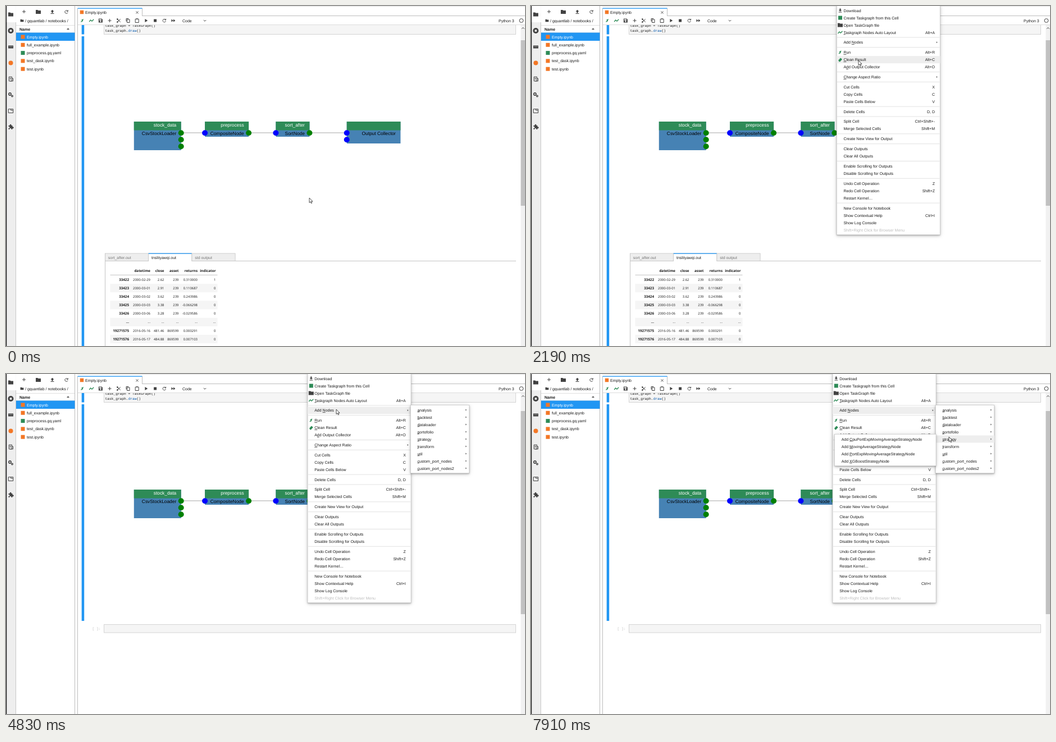
These frames come from a looping animation (924 px wide and 606 px high, 7990 ms). An HTML page:

```html
<!DOCTYPE html>
<html lang="en">
<head>
<meta charset="utf-8">
<title>Task graph notebook</title>
<style>
html, body { margin: 0; width: 100%; height: 100%; overflow: hidden; background: #fff; }
svg { display: block; width: 924px; height: 606px; }
text { font: 7px "Liberation Sans", Arial, sans-serif; fill: #1a1a1a; white-space: pre; text-rendering: geometricPrecision; }
.end { text-anchor: end; }
.b { font-weight: 700; }
.dim { fill: #bdbdbd; }
.soft { fill: #757575; }
.node { font-size: 8.37px; fill: #000; }
.w { fill: #fff; }
.code { font: 6.22px "Liberation Mono", monospace; }
.cell { font: 5.95px "Open Sans", "Noto Sans", sans-serif; }
.head { font: 700 6.25px "Open Sans", "Noto Sans", sans-serif; }
.u { text-decoration: underline; }
.shadow { filter: drop-shadow(0 1.6px 1.3px rgba(0, 0, 0, .22)) drop-shadow(0 2.4px 2.7px rgba(0, 0, 0, .14)) drop-shadow(0 .5px 4.5px rgba(0, 0, 0, .1)); }
.line { fill: none; stroke: #424242; stroke-width: 1; }
.green { fill: none; stroke: #2e8b57; stroke-width: 1.3; }
</style>
</head>
<body>
<svg id="stage" viewBox="0 0 924 606"></svg>
<script>
const LOOP = 7990, ROW = 13, SEP = 4.82;
const INK = '#424242', BLUE = '#2196f3', ORANGE = '#f37726', GREEN = '#2e8b57';

const rect = (x, y, w, h, fill, more = '') =>
  `<rect x="${x}" y="${y}" width="${w}" height="${h}" fill="${fill}" ${more}/>`;
const text = (x, y, s, cls = '') => `<text x="${x}" y="${y + 2.5}" class="${cls}">${s}</text>`;
const dot = (x, y, r, fill) => `<circle cx="${x}" cy="${y}" r="${r}" fill="${fill}"/>`;
const ring = (x, y, r, width) =>
  `<circle cx="${x}" cy="${y}" r="${r}" fill="none" stroke="${INK}" stroke-width="${width}"/>`;
const hline = (x, y, w, color = '#d5d5d5') => rect(x, y, w, 1, color);
const square = (x, y, fill, s = 7) => rect(x - s / 2, y - s / 2, s, s, fill);
const group = (id, body) => `<g id="${id}">${body}</g>`;

// Icons are centred on 0,0; names in `stroked` are drawn as outlines.
const shapes = {
  folder: 'M-4.5-3.5h3.5l1 1h4.5v6h-9z',
  plus: 'M-3 0h6M0-3v6',
  refresh: 'M2.3-1.4A2.7 2.7 0 1 0 2.6 1M2.8-3.2v2.2H.6',
  upload: 'M0-3.8l3 3h-1.7v2.5h-2.6v-2.5H-3zM-3 2.5h6v1h-6z',
  download: 'M0 1.8l-2.8-2.6h1.7v-2.7h2.2v2.7h1.7zM-2.8 2.4h5.6v1h-5.6z',
  save: 'M-3.5-3.5h5.5l1.5 1.5v5.5h-7zM-2.3-2.5v2h3.8v-2zM-1.2 1.2a1.2 1.2 0 1 0 2.4 0a1.2 1.2 0 1 0-2.4 0z',
  cut: 'M-3-3.2L2.8 2.8M-3 3.2L2.8-2.8M-3.4-2.5a1 1 0 1 0 2 0a1 1 0 1 0-2 0M-3.4 2.5a1 1 0 1 0 2 0a1 1 0 1 0-2 0',
  copy: 'M-1.5-2h4.5v5.5h-4.5zM-3 1.5v-5h4.2',
  paste: 'M-3-2.8h6v6.3h-6zM-1.3-3.3h2.6',
  play: 'M-2-3l4.8 3l-4.8 3z',
  stop: 'M-2.5-2.5h5v5h-5z',
  forward: 'M-3.5-2.6l3.4 2.6l-3.4 2.6zM0-2.6l3.4 2.6l-3.4 2.6z',
  down: 'M-2.2-1l2.2 2.2l2.2-2.2',
  up: 'M-2.2 1.2L0-1.2l2.2 2.4',
  close: 'M-2-2l4 4M2-2l-4 4',
  graph: 'M-4 2l2.4-3l2.4 2l3.2-3.2',
  run: 'M-2.5 2.5l2-2l1 .8M-1.5-1l2.5-1l-.8 2.4',
  eraser: 'M-3.3 1l3.8-4.2l3 2.6l-3.8 4.2h-1.6z',
  keys: 'M-4.5-2.5h9v5h-9zM-3-1v1h1v-1zM-.5-1v1h1v-1zM2-1v1h1v-1z',
  doc: 'M-3.2-3.8h5.2v7.6h-5.2zM2.5-1h1.5v4.8h-5M-1.8-1.5h2.4M-1.8.3h2.4',
  tab: 'M-4.2-3.3h8.4v6.8h-8.4zM.2-3.3v2.2h4',
  puzzle: 'M-4-2.5h2.3a1.5 1.5 0 1 1 2.6 0h2.1v2.4a1.5 1.5 0 1 1 0 2.6v1.8h-2.4a1.4 1.4 0 1 0-2.4 0h-2.2v-2.3a1.4 1.4 0 1 0 0-2.4z',
  arrow: 'M-1-1.5l1.8 1.5l-1.8 1.5z',
};
const stroked = 'plus refresh cut copy paste down up close doc tab'.split(' ');
const greens = ['graph', 'run'];
const icon = (name, x, y, fill = INK) => {
  const look = stroked.includes(name) ? 'class="line"'
    : greens.includes(name) ? 'class="green"' : `fill="${fill}" fill-rule="evenodd"`;
  return `<path d="${shapes[name]}" transform="translate(${x} ${y})" ${look}/>`;
};

function sidebar() {
  const files = ['Empty.ipynb', 'full_example.ipynb', 'preprocess.gq.yaml', 'test_dask.ipynb', 'test.ipynb'];
  return rect(0, 0, 1.5, 606, '#111') + rect(1.5, 0, 16, 606, '#eee') + rect(1.5, 0, 16, 29, '#fff')
    + rect(17, 29, 1, 577, '#c8c8c8') + rect(122, 0, 1, 606, '#bdbdbd')
    + icon('folder', 8.5, 15) + dot(8.5, 44, 5, INK) + square(8.5, 44, '#eee', 3.6)
    + icon('keys', 8.5, 73) + dot(8.5, 101.5, 4, ORANGE) + icon('doc', 8.5, 130)
    + ring(7, 157, 2.1, 1.6) + ring(11, 160.5, 1.3, 1.3)
    + icon('tab', 8.5, 187) + icon('puzzle', 8.5, 215.5)
    + icon('plus', 32, 10) + icon('folder', 57.5, 10.5) + icon('upload', 82.5, 10.5) + icon('refresh', 107.5, 10.5)
    + `<g transform="translate(28.5 26) scale(.65)">${icon('folder', 0, 0)}</g>`
    + text(34, 26, '/ gquantlab / notebooks /')
    + hline(18, 34, 104, '#e0e0e0') + hline(18, 47, 104, '#e0e0e0')
    + text(24, 41, 'Name', 'b') + `<path d="M108 42l2.5-2.6l2.5 2.6z" fill="${INK}"/>`
    + rect(18, 47.5, 104.5, 14.5, BLUE)
    + files.map((name, i) => {
      const y = 55 + 14.3 * i;
      return square(30, y, name.endsWith('yaml') ? GREEN : ORANGE) + text(37, y, name, i ? '' : 'w');
    }).join('');
}

function chrome() {
  const tools = 'run graph save plus cut copy paste play stop refresh forward'.split(' ');
  return rect(127, 0, 797, 33.5, '#fff') + rect(127, 4, 1, 602, '#bdbdbd')
    + hline(127, 0, 797, '#e4e4e4') + hline(242, 17, 682, '#bdbdbd')
    + rect(242, 4, 1, 14, '#bdbdbd') + rect(127.5, 3.5, 115, 1.3, BLUE)
    + square(135, 11, ORANGE, 6.5) + text(141, 11, 'Empty.ipynb') + icon('close', 233.5, 11.5)
    + tools.map((name, i) => icon(name, 136 + 16.2 * i, 26)).join('')
    + text(314, 26, 'Code') + icon('down', 354, 26) + text(877, 26, 'Python 3')
    + `<circle cx="917.5" cy="26" r="3.4" class="line"/>` + hline(128, 33, 796, '#dcdcdc');
}

function node(x, w, h, title, label, ins, outs) {
  const tx = x + w - 8.5, ports = (n, px, color) =>
    Array.from({ length: n }, (_, i) => dot(px, 226.2 + 12 * i, 5, color)).join('');
  return rect(x, 206, w, h, '#4682b4') + rect(x, 206, w, 15.5, GREEN)
    + text(tx, 212, title, 'node end w') + text(tx, 227.3, label, 'node end')
    + ports(ins, x, '#00f') + ports(outs, x + w, 'green');
}

function notebook() {
  const box = 'stroke="#d4d4d4" stroke-width="1"';
  return rect(174.5, 20, 733, 30.5, '#f5f5f5', box)
    + text(176.5, 34, 'task_graph = TaskGraph()', 'code')
    + text(176.5, 43.3, 'task_graph.<tspan fill="#0055aa">draw</tspan>()', 'code')
    + rect(134.7, 33, 4.5, 17.5, BLUE)
    + [[312, 354], [432, 481], [540, 607]].map(([a, b]) => rect(a, 225.5, b - a, 1, '#a6a6a6')).join('')
    + node(227.8, 83.9, 51, 'stock_data', 'CsvStockLoader', 0, 3)
    + node(354.1, 78, 27, 'preprocess', 'CompositeNode', 1, 1)
    + node(480.4, 60, 27, 'sort_after', 'SortNode', 1, 1)
    + node(606.7, 95.7, 39, '', 'Output Collector', 2, 0);
}

const scrollbar = (y, h) => rect(916.5, 34, 7.5, 572, '#f1f1f1') + rect(916.5, y, 7.5, h, '#c1c1c1') + icon('up', 920.5, 39.5);

function results() {
  const cols = [219, 257, 281.5, 307.5, 341, 373.5];
  const rows = [
    '33422 2000-02-29 2.62 239 0.310000 1', '33423 2000-03-01 2.91 239 0.110687 0',
    '33424 2000-03-02 3.62 239 0.243986 0', '33425 2000-03-03 3.38 239 -0.066298 0',
    '33426 2000-03-06 3.28 239 -0.029586 0', '... ... ... ... ... ...',
    '19271575 2016-05-16 481.46 869599 0.000291 0', '19271576 2016-05-17 484.88 869599 0.007103 0'];
  const tab = (i, name, on) => {
    const x = 176.5 + 77.2 * i;
    return rect(x, 441, 77.2, 13.5, on ? '#fff' : '#eee', 'stroke="#c4c4c4" stroke-width=".8"')
      + (on ? rect(x, 440.5, 77.2, 1.3, BLUE) + rect(x + .5, 453, 76.2, 3, '#fff') : '')
      + text(x + 5.3, 448, name, on ? '' : 'soft');
  };
  return rect(134.7, 54, 4.5, 552, BLUE) + hline(176, 454, 732, '#c4c4c4') + rect(176, 441, 1, 165, '#c4c4c4')
    + tab(0, 'sort_after.out') + tab(1, 'tnslityawqi.out', true) + tab(2, 'std output')
    + 'datetime close asset returns indicator'.split(' ').map((h, i) => text(cols[i + 1], 471.7, h, 'head end')).join('')
    + hline(185.5, 479, 191, '#c4c4c4')
    + rows.map((row, r) => {
      const y = 487.5 + 15.15 * r;
      return (r % 2 ? rect(185.5, y - 7.5, 191, 15.15, '#f5f5f5') : '')
        + row.split(' ').map((v, i) => text(cols[i], y - .3, v, i ? 'cell end' : 'head end')).join('');
    }).join('') + scrollbar(61, 295);
}

const emptyCell = () => rect(134.7, 54, 4.5, 386, BLUE)
  + text(153.5, 453.8, '[ ]:', 'code dim') + rect(174.5, 446.5, 733, 14.5, '#f5f5f5', 'stroke="#d4d4d4" stroke-width="1"')
  + scrollbar(66, 362);

// Item syntax: "icon:Label|shortcut"; "&" marks the mnemonic, ">" a submenu, "-" a separator.
const menus = {};
function menu(id, x, first, w, items) {
  let y = first, body = '';
  const rows = menus[id] = [];
  for (const item of items) {
    if (item === '-') {
      body += hline(x + 1, y - ROW / 2 + SEP / 2 - .5, w - 2, '#e2e2e2');
      y += SEP;
      continue;
    }
    const [, name, label, key] = item.match(/^(?:(\w+):)?([^|]+)\|?(.*)$/);
    if (name === 'block') body += square(x + 6.5, y, GREEN);
    else if (name) body += icon(name, x + 6.5, y, name === 'eraser' ? GREEN : INK);
    body += text(x + 12.4, y, label.replace(/&(.)/, '<tspan class="u">$1</tspan>'), label.startsWith('Shift') ? 'dim' : '');
    if (key === '>') body += icon('arrow', x + w - 5.7, y);
    else if (key) body += text(x + w - 9.5, y, key, 'end');
    rows.push(y);
    y += ROW;
  }
  const top = first - 9;
  return group(id, rect(x, top, w, y - 4 - top, '#fff', 'class="shadow"')
    + rect(x + .3, top + .3, w - .6, y - 4.6 - top, 'none', 'stroke="#bdbdbd" stroke-width=".6"')
    + rect(x, -50, w, ROW, '#eee', 'class="hover"') + body);
}

const mainItems = ['download:Download', 'block:Create Taskgraph from this Cell', 'folder:Open TaskGraph file',
  'graph:&Taskgraph Nodes Auto Layout|Alt+A', '-', 'Add &Nodes|>', '-',
  'run:&Run|Alt+R', 'eraser:&Clean Result|Alt+C', 'A&dd Output Collector|Alt+O', '-', '&Change Aspect Ratio|>', '-',
  'Cut Cells|X', 'Copy Cells|C', 'Paste Cells Below|V', '-', 'Delete Cells|D, D', '-',
  'Split Cell|Ctrl+Shift+-', 'Merge Selected Cells|Shift+M', '-', 'Create New View for Output', '-',
  'Clear Outputs', 'Clear All Outputs', '-', 'Enable Scrolling for Outputs', 'Disable Scrolling for Outputs', '-',
  'Undo Cell Operation|Z', 'Redo Cell Operation|Shift+Z', 'Restart Kernel…', '-',
  'New Console for Notebook', 'Show Contextual Help|Ctrl+I', 'Show Log Console', 'Shift+Right Click for Browser Menu'];
const nodeGroups = 'analysis backtest dataloader portofolio strategy transform util custom_port_nodes custom_port_nodes2';
const adders = names => names.split(' ').map(n => `Add &${n}Node`);

const $ = id => document.getElementById(id);
$('stage').innerHTML = notebook() + group('results', results()) + group('blank', emptyCell())
  + chrome() + sidebar()
  + menu('main', 0, 8, 184.5, mainItems)
  + menu('groups', 720, 64, 105, nodeGroups.split(' ').map(n => `&${n}|>`))
  + menu('transform', 599, 129, 122.3, adders('AssetFilter AssetIndicator Average DatetimeFilter Drop Indicator LeftMerge Max Min Rename ReturnFeature Sort ValueFilter'))
  + menu('strategy', 540.3, 116, 181, adders('CpuPortExpMovingAverageStrategy MovingAverageStrategy PortExpMovingAverageStrategy XGBoostStrategy'))
  + '<path id="cursor" d="M0 0v8.6l2-1.8l1.4 3l1.4-.7l-1.4-2.8h2.6z" fill="#fff" stroke="#222" stroke-width=".8"/>';

// Pointer moves: first step, last step (ms), number of steps, end point.
const moves = [
  [70, 310, 4, 543, 304], [1030, 1570, 8, 579, 134], [1650, 1810, 3, 581, 105],
  [1870, 2030, 3, 583, 97], [2430, 2810, 6, 537, 285],
  [3890, 4110, 4, 577, 139], [4190, 4590, 6, 588, 63],
  [5130, 5590, 7, 730, 68], [5670, 5910, 4, 766, 94],
  [5990, 6150, 3, 766, 115], [6230, 6390, 3, 767, 126],
  [6910, 7130, 4, 760, 113], [7830, 7910, 2, 744, 112]];

function pointer(t) {
  let x = 540, y = 342;
  for (const [from, to, steps, x1, y1] of moves) {
    if (t < from) break;
    const step = Math.min(steps, Math.floor((t - from) / (to - from) * (steps - 1) + 1e-6) + 1);
    const p = 1 - (1 - step / steps) ** 1.3;
    x += (x1 - x) * p;
    y += (y1 - y) * p;
  }
  return [x, y];
}

const show = (id, on) => $(id).setAttribute('visibility', on ? 'visible' : 'hidden');
function hover(id, y) {
  const row = menus[id].find(c => Math.abs(y - c) < ROW / 2);
  $(id).querySelector('.hover').setAttribute('y', row === undefined ? -50 : row - ROW / 2);
}

function draw() {
  const t = performance.now() % LOOP;
  const [x, y] = pointer(t);
  const second = t >= 3350, nested = t >= 4830, cleaned = t >= 2430;
  const left = second ? 536.8 : 544;
  show('results', !cleaned);
  show('blank', cleaned);
  show('main', second || (t >= 470 && t < 2350));
  show('groups', nested);
  show('transform', t >= 6690 && t < 7290);
  show('strategy', t >= 7290);
  $('main').setAttribute('transform', `translate(${left})`);
  hover('main', nested ? menus.main[4] : x > left ? y : -99);
  hover('groups', x > 721 ? y : -99);
  $('cursor').setAttribute('transform', `translate(${x} ${y})`);
  requestAnimationFrame(draw);
}
draw();
</script>
</body>
</html>
```
